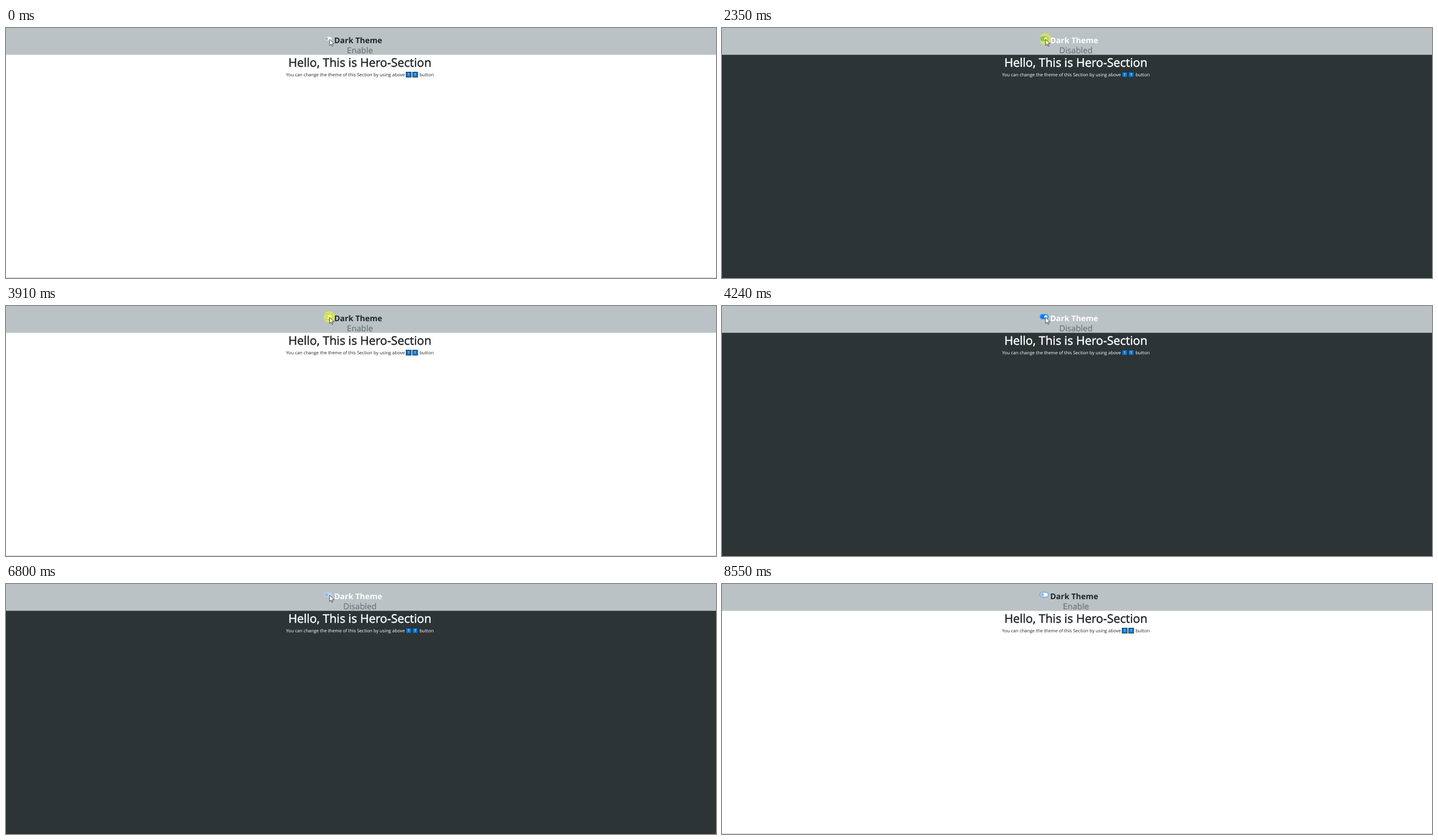
Recreate the animation shown at these times as an HTML page with a canvas. Size 1259x445 px, loop 8700 ms.

```html
<!DOCTYPE html>
<html lang="en">
<head>
<meta charset="utf-8">
<title>Theme switch</title>
<style>
html, body { margin: 0; width: 100%; height: 100%; overflow: hidden; background: #fff; }
canvas { display: block; width: 1259px; height: 445px; }
</style>
</head>
<body>
<canvas id="stage" width="1259" height="445"></canvas>
<script>
const ctx = document.getElementById('stage').getContext('2d');
const W = 1259, H = 445, LOOP = 8700, FADE = 140;
const FONT = '"Open Sans", "Noto Sans", sans-serif';
const DARK = '#2d3436', INK = '#212529';

// Each click: mouse down, then release, which flips the theme.
const clicks = [
  { down: 620, up: 875 },
  { down: 2350, up: 2525 },
  { down: 3910, up: 4095 },
  { down: 5540, up: 5540 },
  { down: 6620, up: 6795 },
  { down: 7940, up: 8095 }
];

const OFF = { track: [255, 255, 255], edge: [173, 181, 189], knob: [173, 181, 189], x: 0 };
const ON = { track: [0, 123, 255], edge: [0, 123, 255], knob: [255, 255, 255], x: 6 };
const ACTIVE = [179, 215, 255], FOCUS = [128, 189, 255];

const mix = (a, b, k) => a + (b - a) * k;
const blend = (a, b, k) => a.map((v, i) => mix(v, b[i], k));
const rgb = c => `rgb(${c.map(Math.round).join()})`;
const ease = k => {
  k = Math.min(1, Math.max(0, k));
  return k * k * (3 - 2 * k);
};

function stateAt(t) {
  const done = clicks.filter(c => c.up <= t);
  const on = done.length % 2 === 1;
  const now = on ? ON : OFF, before = on ? OFF : ON;
  const press = clicks.find(c => c.down <= t && t < c.up);
  const rest = on ? ON.edge : done.length ? FOCUS : OFF.edge;
  const s = { on, pressed: !!press, ring: done.length ? 1 : 0,
              track: now.track, edge: rest, knob: now.knob, x: now.x };
  if (press) {
    const k = ease((t - press.down) / FADE);
    s.track = blend(s.track, ACTIVE, k);
    s.edge = blend(s.edge, ACTIVE, k);
    s.ring *= 1 - k;
  } else if (done.length) {
    const k = ease((t - done[done.length - 1].up) / FADE);
    s.track = blend(ACTIVE, s.track, k);
    s.edge = blend(ACTIVE, s.edge, k);
    s.knob = blend(before.knob, s.knob, k);
    s.x = mix(before.x, s.x, k);
    s.ring = k;
  }
  return s;
}

function text(str, x, y, size, color, { weight = 400, align = 'left', bold = 0 } = {}) {
  ctx.font = `${weight} ${size}px ${FONT}`;
  ctx.textAlign = align;
  ctx.fillStyle = ctx.strokeStyle = color;
  ctx.fillText(str, x, y);
  if (bold) {
    ctx.lineWidth = bold;
    ctx.lineJoin = 'round';
    ctx.strokeText(str, x, y);
  }
}

function pill(x, y, w, h, color) {
  ctx.fillStyle = color;
  ctx.beginPath();
  ctx.roundRect(x, y, w, h, h / 2);
  ctx.fill();
}

function disc(x, y, r, color) {
  ctx.fillStyle = color;
  ctx.beginPath();
  ctx.arc(x, y, r, 0, Math.PI * 2);
  ctx.fill();
}

function toggle(s) {
  const x = 564.3, y = 15;
  if (s.ring > 0) {
    pill(x - 1.6, y - 1.6, 17.2, 11.2, `rgba(0,123,255,${0.25 * s.ring})`);
  }
  pill(x, y, 14, 8, rgb(s.edge));
  pill(x + 0.8, y + 0.8, 12.4, 6.4, rgb(s.track));
  disc(x + 4 + s.x, y + 4, 2.8, rgb(s.knob));
}

function arrowTile(x) {
  ctx.fillStyle = '#26343f';
  ctx.fillRect(x, 78, 10, 10);
  ctx.fillStyle = '#0078d7';
  ctx.fillRect(x + 1, 79, 8, 8);
  ctx.strokeStyle = '#b9dcf7';
  ctx.lineWidth = 0.8;
  ctx.beginPath();
  ctx.moveTo(x + 5, 85.5);
  ctx.lineTo(x + 5, 80.7);
  ctx.moveTo(x + 3.5, 82.3);
  ctx.lineTo(x + 5, 80.7);
  ctx.lineTo(x + 6.5, 82.3);
  ctx.stroke();
}

function cursor(t, pressed) {
  if (t >= 8550) return;
  const k = t < 8400 ? 0 : t < 8475 ? 0.4 : 1;
  ctx.save();
  ctx.translate(mix(573.8, 898.3, k), mix(20, 199.5, k));
  ctx.scale(0.7, 0.7);
  ctx.beginPath();
  ctx.moveTo(0, 0);
  ctx.lineTo(0, 16);
  ctx.lineTo(3.7, 12.5);
  ctx.lineTo(6.2, 18.2);
  ctx.lineTo(8.6, 17.2);
  ctx.lineTo(6.1, 11.6);
  ctx.lineTo(11.3, 11.6);
  ctx.closePath();
  ctx.fillStyle = pressed ? '#f8f5b4' : '#fff';
  ctx.fill();
  ctx.strokeStyle = '#222';
  ctx.lineWidth = 1.1;
  ctx.stroke();
  ctx.restore();
}

function draw(t) {
  const s = stateAt(t);
  const ink = s.on ? '#fff' : INK;
  ctx.textRendering = 'geometricPrecision';
  ctx.fillStyle = s.on ? DARK : '#fff';
  ctx.fillRect(0, 0, W, H);
  ctx.fillStyle = '#bac2c5';
  ctx.fillRect(0, 0, W, 47.7);
  if (!s.on) {
    ctx.fillStyle = '#c9cccd';
    ctx.fillRect(0, 444, W, 1);
  }

  text('Dark Theme', 582, 27, 14, ink, { weight: 700 });
  text(s.on ? 'Disabled' : 'Enable', 627.6, 45, 14.6, '#6c757d', { align: 'center', bold: 0.2 });
  text('Hello, This is Hero-Section', 627.5, 68.7, 21, ink, { align: 'center', bold: 0.5 });
  text('You can change the theme of this Section by using above', 496.5, 86, 8, ink);
  arrowTile(709);
  arrowTile(720.5);
  text('button', 733.2, 86, 8, ink);

  toggle(s);
  if (s.pressed) disc(573, 19.5, 10.3, 'rgba(245,250,20,0.55)');
  cursor(t, s.pressed);
}

const start = performance.now();
function tick() {
  draw((performance.now() - start) % LOOP);
  requestAnimationFrame(tick);
}
tick();
</script>
</body>
</html>
```
